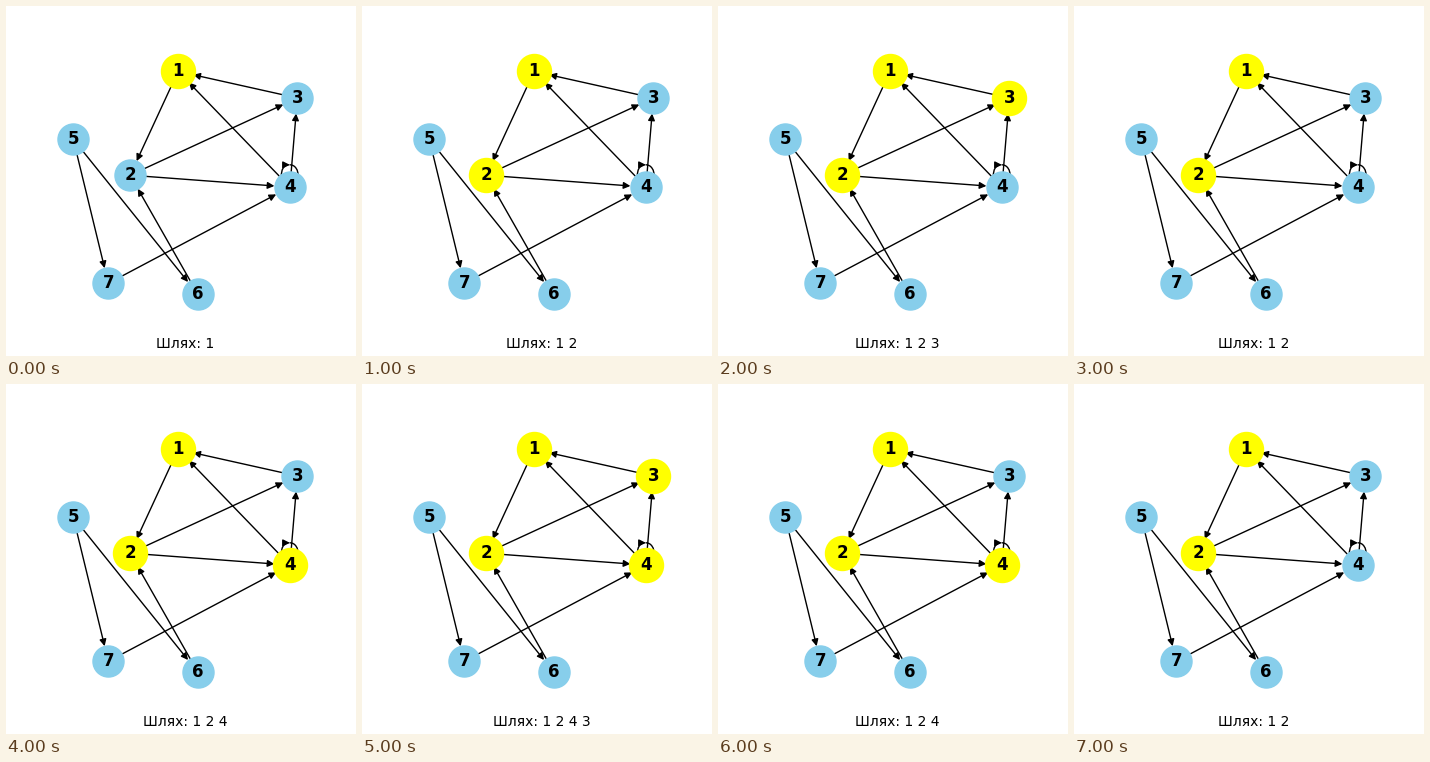
A matplotlib script for the animation above (8000 ms loop, 350x350 px).

```python
import math
from itertools import islice

import matplotlib.pyplot as plt
from matplotlib.animation import FuncAnimation
from matplotlib.patches import FancyArrowPatch
from matplotlib.path import Path

SIZE, DPI = 350, 100
NODE_AREA, ACTIVE_AREA = 500, 600
FRAMES = 8

# Node centres in pixels, y pointing down.
NODES = dict(enumerate([(172.1, 65.4), (124.1, 169.2), (291.4, 92),
                        (283.9, 181.1), (67.3, 133.3), (191.8, 288.1),
                        (102.3, 277.3)], start=1))
GRAPH = {1: [2], 2: [3, 4], 3: [1], 4: [1, 3, 4], 5: [6, 7], 6: [2], 7: [4]}


def search(path):
    """Yield the current path at each step of a backtracking search."""
    yield path
    for node in GRAPH[path[-1]]:
        if node not in path:
            yield from search(path + [node])
            yield path


def loop_path(x, y):
    """Closed loop through a node, a tenth as tall as the whole graph."""
    rows = [pos[1] for pos in NODES.values()]
    height = (max(rows) - min(rows)) / 10
    top, half = y - height, height / 2
    points = [(x, top), (x + half, top), (x + half, y), (x, y),
              (x - half, y), (x - half, top), (x, top)]
    return Path(points, [Path.MOVETO] + [Path.CURVE4] * 6)


def add_edge(a, b):
    gap = math.sqrt(NODE_AREA) / 2
    if a == b:
        shape = dict(path=loop_path(*NODES[a]))
    else:
        shape = dict(posA=NODES[a], posB=NODES[b], shrinkA=gap, shrinkB=gap)
    ax.add_patch(FancyArrowPatch(arrowstyle="-|>", mutation_scale=10,
                                 color="black", linewidth=1, zorder=1,
                                 **shape))


def add_text(x, y, text, **style):
    return ax.text(x, y, text, family="DejaVu Sans", ha="center",
                   va="center", zorder=3, **style)


fig = plt.figure(figsize=(SIZE / DPI, SIZE / DPI), dpi=DPI, facecolor="white")
ax = fig.add_axes([0, 0, 1, 1])
ax.set(xlim=(0, SIZE), ylim=(SIZE, 0), autoscale_on=False)
ax.axis("off")

for start, ends in GRAPH.items():
    for end in ends:
        add_edge(start, end)

ax.scatter(*zip(*NODES.values()), s=NODE_AREA, c="skyblue", zorder=2)
active = ax.scatter([], [], s=ACTIVE_AREA, c="yellow", zorder=2.5)
for name, pos in NODES.items():
    add_text(*pos, str(name), fontsize=12, fontweight="bold")
caption = add_text(179.375, 338.45, "", fontsize=10)

PATHS = list(islice(search([1]), FRAMES))


def update(i):
    active.set_offsets([NODES[n] for n in PATHS[i]])
    caption.set_text("Шлях: " + " ".join(map(str, PATHS[i])))
    return active, caption


anim = FuncAnimation(fig, update, frames=FRAMES, interval=1000,
                     repeat=True, repeat_delay=0)
plt.show()
```
